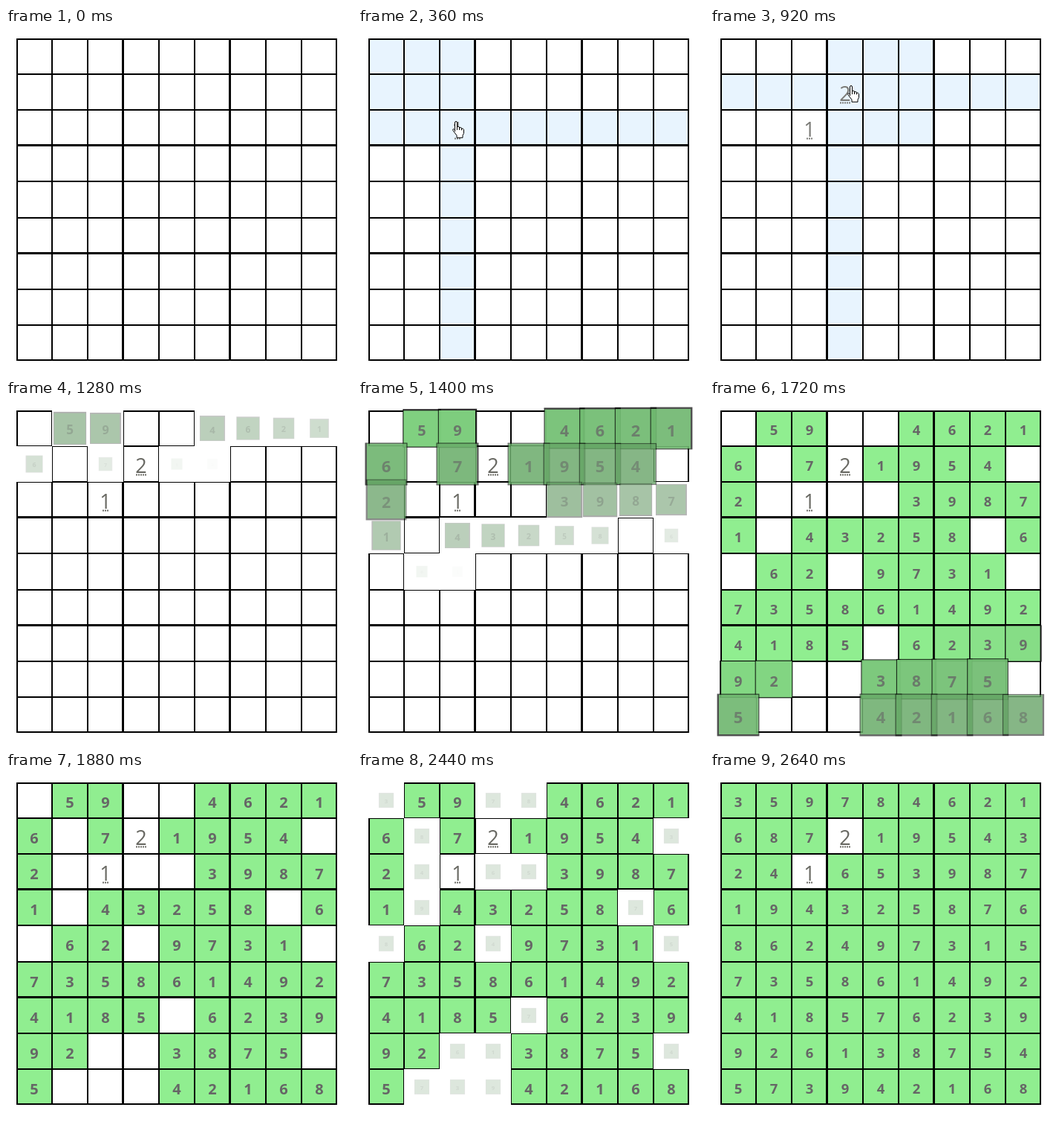
Animation, 466 px wide and 462 px high, one loop 3040 ms. Source, as an HTML page with a canvas:

```html
<!DOCTYPE html>
<html lang="en">
<head>
<meta charset="utf-8">
<title>Sudoku solver</title>
<style>
  html, body { margin: 0; width: 100%; height: 100%; overflow: hidden; background: #fff; }
  canvas { display: block; }
</style>
</head>
<body>
<canvas id="stage" width="466" height="462"></canvas>
<script>
const ctx = document.getElementById('stage').getContext('2d');
const LOOP = 3040, STEP = 40;
const FONT = '"Open Sans", "Noto Sans", sans-serif';

const solution = [
  '359784621', '687219543', '241653987',
  '194325876', '862497315', '735861492',
  '418576239', '926138754', '573942168'
];
// Cells marked x stay empty until the second wave; t marks the typed ones.
const plan = [
  'x..xx....', '.x.t....x', '.xtxx....',
  '.x.....x.', 'x..x....x', '.........',
  '....x....', '..xx....x', '.xxx.....'
];
const WAVE1 = 1207, STAGGER = 5, WAVE2 = 2418, POP = 220, PEAK = 0.66;
const CLEAR = 1120;
const typedAt = { 1: 320, 2: 800 };

const rowTop = r => Math.round(14 + 48.1 * r);
const cells = [];
for (let r = 0; r < 9; r++) {
  for (let c = 0; c < 9; c++) {
    const y = rowTop(r), kind = plan[r][c];
    cells.push({
      r, c, kind, digit: solution[r][c],
      x: 14 + 48 * c, y, w: 48, h: rowTop(r + 1) - y,
      start: kind === 'x' ? WAVE2 : WAVE1 + STAGGER * (r * 9 + c)
    });
  }
}

// Pointer stops: time, left, top
const stops = [
  [40, -13, -20], [360, 126, 125], [480, 126, 125],
  [600, 183, 66], [720, 183, 66], [920, 184, 77], [CLEAR, 184, 77]
];
const hand = new Path2D('M4.5 14V2q0-1.5 1.5-1.5T7.5 2v6q1-1.3 3 0v1q1.5-1 3 .3v1q2-.8 3 1v5l-1.5 3v3h-8v-3l-5-6.5q-1-2 1-2.3l1.5 1.5z');
const knuckles = new Path2D('M7.5 8v4M10.5 9v3M13.5 10.3v2');

const smooth = x => x * x * (3 - 2 * x);

function popScale(p) {
  if (p < PEAK) return 0.3 + 0.89 * smooth(1 - (1 - p / PEAK) ** 1.6);
  return 1.19 - 0.19 * smooth((p - PEAK) / (1 - PEAK));
}

function pointerAt(t) {
  if (t < 80 || t >= CLEAR) return null;
  const i = stops.findIndex(s => t < s[0]);
  const [t0, x0, y0] = stops[i - 1], [t1, x1, y1] = stops[i];
  const k = (t - t0) / (t1 - t0);
  return { x: x0 + (x1 - x0) * k, y: y0 + (y1 - y0) * k };
}

function hoveredCell(pointer) {
  if (!pointer) return null;
  const x = pointer.x + 6, y = pointer.y + 1;
  return cells.find(q => x >= q.x && x < q.x + q.w && y >= q.y && y < q.y + q.h);
}

const box = q => Math.floor(q.r / 3) * 3 + Math.floor(q.c / 3);
const related = (a, b) => a.r === b.r || a.c === b.c || box(a) === box(b);

function drawBox({ r, c, x, y, w, h }, fill) {
  const left = c ? 1 : 2, top = r ? 1 : 2;
  const right = c % 3 === 2 ? 2 : 1, bottom = r % 3 === 2 ? 2 : 1;
  ctx.fillStyle = '#000';
  ctx.fillRect(x, y, w, h);
  ctx.fillStyle = fill;
  ctx.fillRect(x + left, y + top, w - left - right, h - top - bottom);
}

function drawDigit(q, size, weight, color) {
  ctx.font = `${weight} ${size}px ${FONT}`;
  ctx.textAlign = 'center';
  ctx.fillStyle = color;
  ctx.fillText(q.digit, q.x + q.w / 2, q.y + q.h / 2 + 2.6 + size * 0.357);
}

function drawTyped(q, t) {
  const color = t < CLEAR ? '#7a7a76' : '#686862';
  drawDigit(q, 27, 400, color);
  const dots = q.digit === '1' ? 3 : 5;
  for (let i = 0; i < dots; i++) {
    ctx.fillRect(q.x + 24.5 - dots * 1.5 + i * 3, q.y + 37.5, 2, 2);
  }
}

function drawPopping(q, p) {
  const s = popScale(p), cx = q.x + q.w / 2, cy = q.y + q.h / 2;
  ctx.save();
  ctx.globalAlpha = p;
  ctx.translate(cx, cy);
  ctx.scale(s, s);
  ctx.translate(-cx, -cy);
  drawBox(q, '#90ee90');
  drawDigit(q, 18.5, 700, '#666');
  ctx.restore();
}

function drawPointer({ x, y }) {
  ctx.save();
  ctx.translate(Math.round(x), Math.round(y));
  ctx.fillStyle = '#fff';
  ctx.strokeStyle = '#000';
  ctx.lineWidth = 1;
  ctx.fill(hand);
  ctx.stroke(hand);
  ctx.stroke(knuckles);
  ctx.restore();
}

function draw(t) {
  ctx.fillStyle = '#fff';
  ctx.fillRect(0, 0, 466, 462);
  const pointer = pointerAt(t), hovered = hoveredCell(pointer);
  const digitSize = t >= 1880 && t < 2480 ? 20 : 18.5;
  const popping = [];

  for (const q of cells) {
    const p = (t - q.start) / POP;
    if (q.kind === 't' || p <= 0) {
      drawBox(q, hovered && related(q, hovered) ? '#e8f4fe' : '#fff');
      if (q.kind === 't' && t >= typedAt[q.digit]) drawTyped(q, t);
    } else if (p < 1) {
      popping.push([q, p]);
    } else {
      drawBox(q, '#90ee90');
      drawDigit(q, digitSize, 700, '#666');
    }
  }
  for (const [q, p] of popping) drawPopping(q, p);
  if (pointer) drawPointer(pointer);
}

const begin = performance.now();
function tick() {
  const t = (performance.now() - begin) % LOOP;
  draw(Math.floor(t / STEP) * STEP);
  requestAnimationFrame(tick);
}
tick();
</script>
</body>
</html>
```
